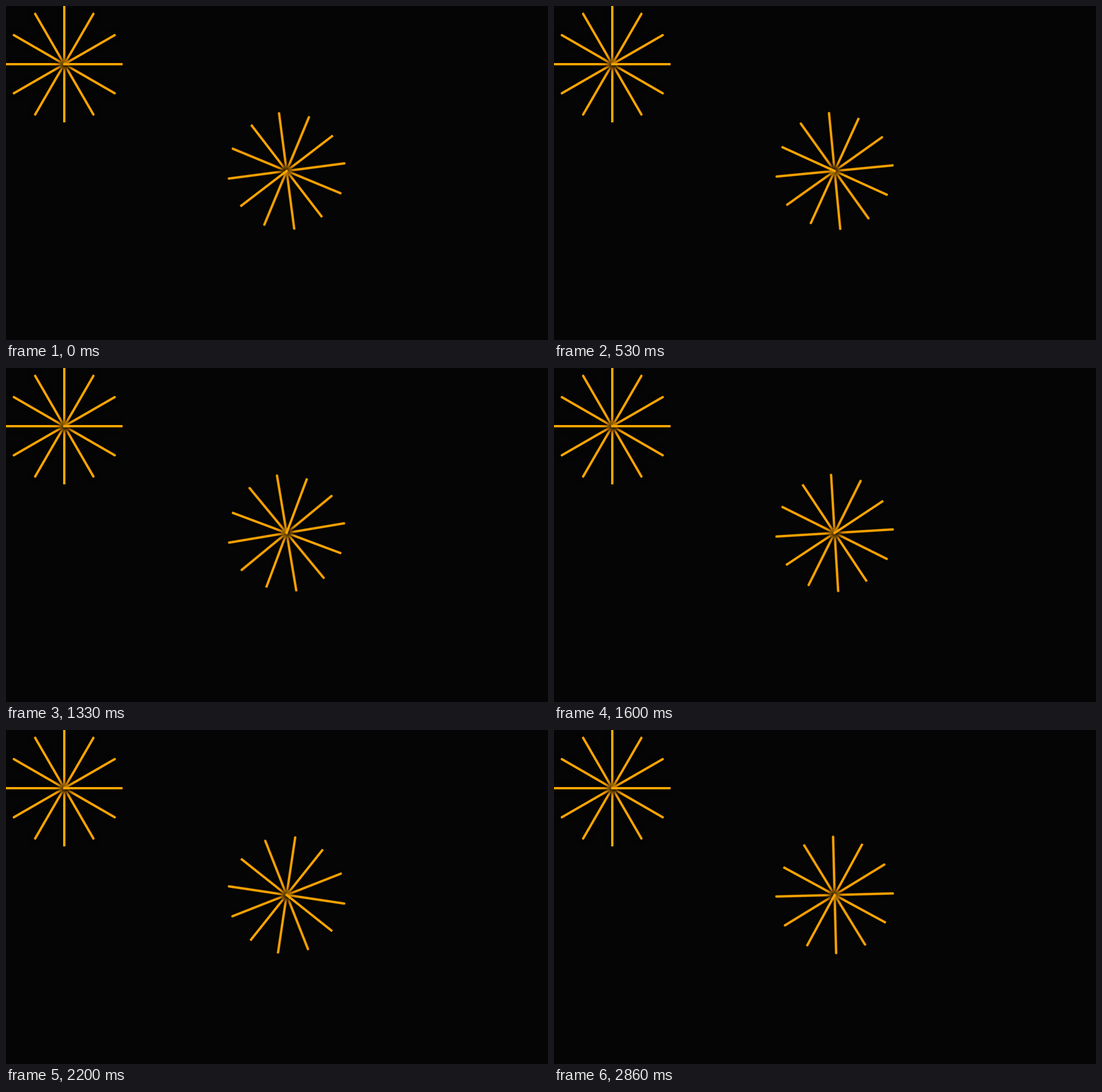
An HTML page with a canvas for the animation above (2.92 s loop, 930 by 574 pixels).

```html
<!DOCTYPE html>
<html>
<head>
<meta charset="utf-8">
<style>
html, body { margin: 0; width: 100%; height: 100%; overflow: hidden; background: #050505; }
canvas { display: block; }
</style>
</head>
<body>
<canvas id="stage" width="930" height="574"></canvas>
<script>
const LOOP = 2920, STEPS = 44, TICK = 2;
// [step, degrees]: the spin advances in uneven runs of 2 degree ticks
const poses = [[0, 142.5], [8, 204.5], [14, 244.5], [20, 290.5], [27, 354.5], [38, 434.5], [43, 478.5]];
const ctx = document.getElementById('stage').getContext('2d');
const star = makeStar();

function makeStar() {
  const canvas = document.createElement('canvas');
  canvas.width = canvas.height = 200;
  const c = canvas.getContext('2d');
  c.translate(100, 100);
  c.strokeStyle = '#ffa500';
  c.lineWidth = 4;
  c.lineCap = 'round';
  // each ray's shadow darkens the roots of the rays before it
  c.shadowColor = '#000';
  c.shadowBlur = 10;
  for (let i = 0; i < 12; i++) {
    c.rotate(Math.PI / 6);
    c.beginPath();
    c.moveTo(0, 0);
    c.lineTo(100, 0);
    c.stroke();
  }
  return canvas;
}

function angleAt(step) {
  const i = Math.max(1, poses.findIndex(p => p[0] >= step));
  const [s0, a0] = poses[i - 1], [s1, a1] = poses[i];
  const turn = (a1 - a0) * (step - s0) / (s1 - s0);
  return a0 + Math.round(turn / TICK) * TICK;
}

function draw(now) {
  const time = now % LOOP;
  const step = Math.min(STEPS - 1, Math.floor((time + 7) * STEPS / LOOP));
  ctx.fillStyle = '#050505';
  ctx.fillRect(0, 0, 930, 574);
  ctx.drawImage(star, 0, 0);
  ctx.save();
  ctx.translate(481.5, 283.5);
  ctx.rotate(angleAt(step) * Math.PI / 180);
  ctx.drawImage(star, -100, -100);
  ctx.restore();
}

const start = performance.now();
function loop() {
  draw(performance.now() - start);
  requestAnimationFrame(loop);
}
loop();
</script>
</body>
</html>
```
